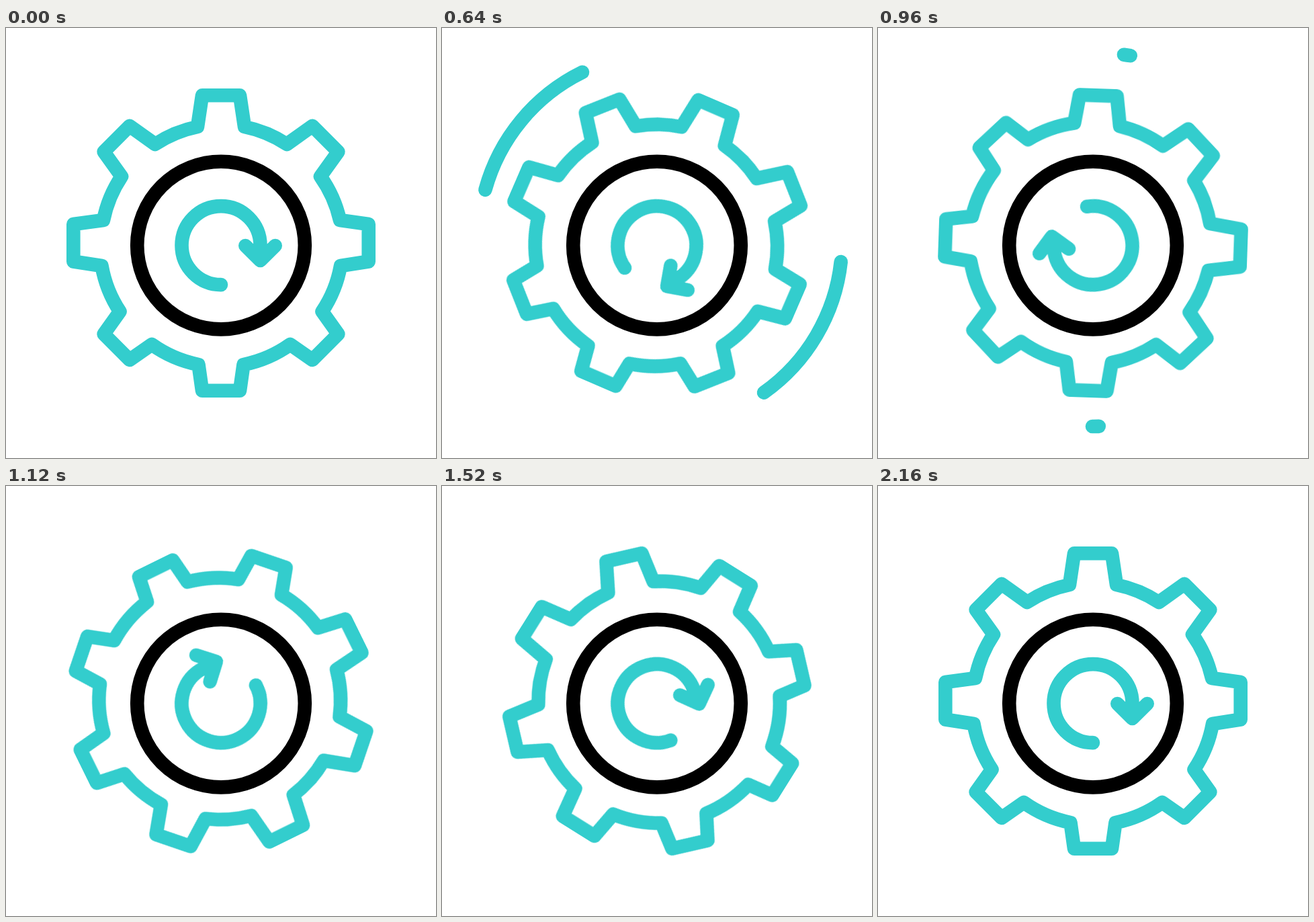
Write an HTML page without scripts that moves like this. It is 640 px wide and 640 px high and loops after 2240 ms.

```html
<!DOCTYPE html>
<html lang="en">
<head>
<meta charset="utf-8">
<title>Turning gear</title>
<style>
  @property --head { syntax: "<length>"; inherits: false; initial-value: 0px; }
  @property --tail { syntax: "<length>"; inherits: false; initial-value: 0px; }

  html, body {
    margin: 0;
    width: 100%;
    height: 100%;
    overflow: hidden;
    background: #fff;
  }
  svg { display: block; width: 100vw; height: 100vh; }
  path, circle {
    fill: none;
    stroke: #33cdcd;
    stroke-width: 20.6;
    stroke-linecap: round;
    stroke-linejoin: round;
  }
  .ring { stroke: #000; }

  .gear, .arrow, .trail {
    animation-duration: 2240ms;
    animation-iteration-count: infinite;
    animation-timing-function: linear;
  }
  .gear { transform-origin: 320px 320px; animation-name: gear; }
  .arrow { transform-origin: 320px 323.6px; animation-name: arrow; }
  .trail {
    stroke-dasharray: calc(var(--head) - var(--tail)) 300px;
    stroke-dashoffset: calc(0px - var(--tail));
    animation-name: head, tail, show;
  }

  @keyframes gear {
    0% { transform: rotate(0deg); }
    8.929% { transform: rotate(0deg); animation-timing-function: cubic-bezier(.59, 0, .41, 1); }
    96.429%, 100% { transform: rotate(360deg); }
  }
  @keyframes arrow {
    0% { transform: rotate(0deg); }
    1.786% { transform: rotate(0deg); animation-timing-function: cubic-bezier(.59, 0, .41, 1); }
    85.714%, 100% { transform: rotate(360deg); }
  }
  @keyframes head {
    0% { --head: 0px; }
    14.554% { --head: 0px; animation-timing-function: cubic-bezier(.59, 0, .41, 1); }
    39.866%, 100% { --head: 100px; }
  }
  @keyframes tail {
    0% { --tail: 0px; }
    21.071% { --tail: 0px; animation-timing-function: cubic-bezier(.59, 0, .41, 1); }
    46.384%, 100% { --tail: 100px; }
  }
  @keyframes show {
    0% { opacity: 0; animation-timing-function: step-end; }
    14.6% { opacity: 1; animation-timing-function: step-end; }
    46.3%, 100% { opacity: 0; }
  }
</style>
</head>
<body>
<svg viewBox="0 0 640 640">
  <path class="trail" pathLength="100" d="M54.9 299.5A276.5 276.5 0 0 1 375.7 41.1"/>
  <path class="trail" pathLength="100" d="M593.8 288.8A275 275 0 0 1 319 593"/>

  <path class="gear" d="M292 100.3H348L355 147A180 180 0 0 1 418 173L456 145.8L494.4 184.2L468 221
    A180 180 0 0 1 497 286L539.7 292V347.5L498 354A180 180 0 0 1 470.5 422L494.4 455.5L456 494L423 471
    A180 180 0 0 1 353.5 501L348 539.7H292L286.5 501A180 180 0 0 1 217 471L184 494L145.6 455.5L169.5 422
    A180 180 0 0 1 142.5 354L100.3 347.5V292L145 286A180 180 0 0 1 172 221L145.6 184.2L184 145.8L222 173
    A180 180 0 0 1 285 147Z"/>

  <circle class="ring" cx="320" cy="323.6" r="124.8"/>

  <path class="arrow" d="M320 382.1A58.5 58.5 0 1 1 378.5 323.6V346M356.3 324L378.5 346L400.7 324"/>
</svg>
</body>
</html>
```
